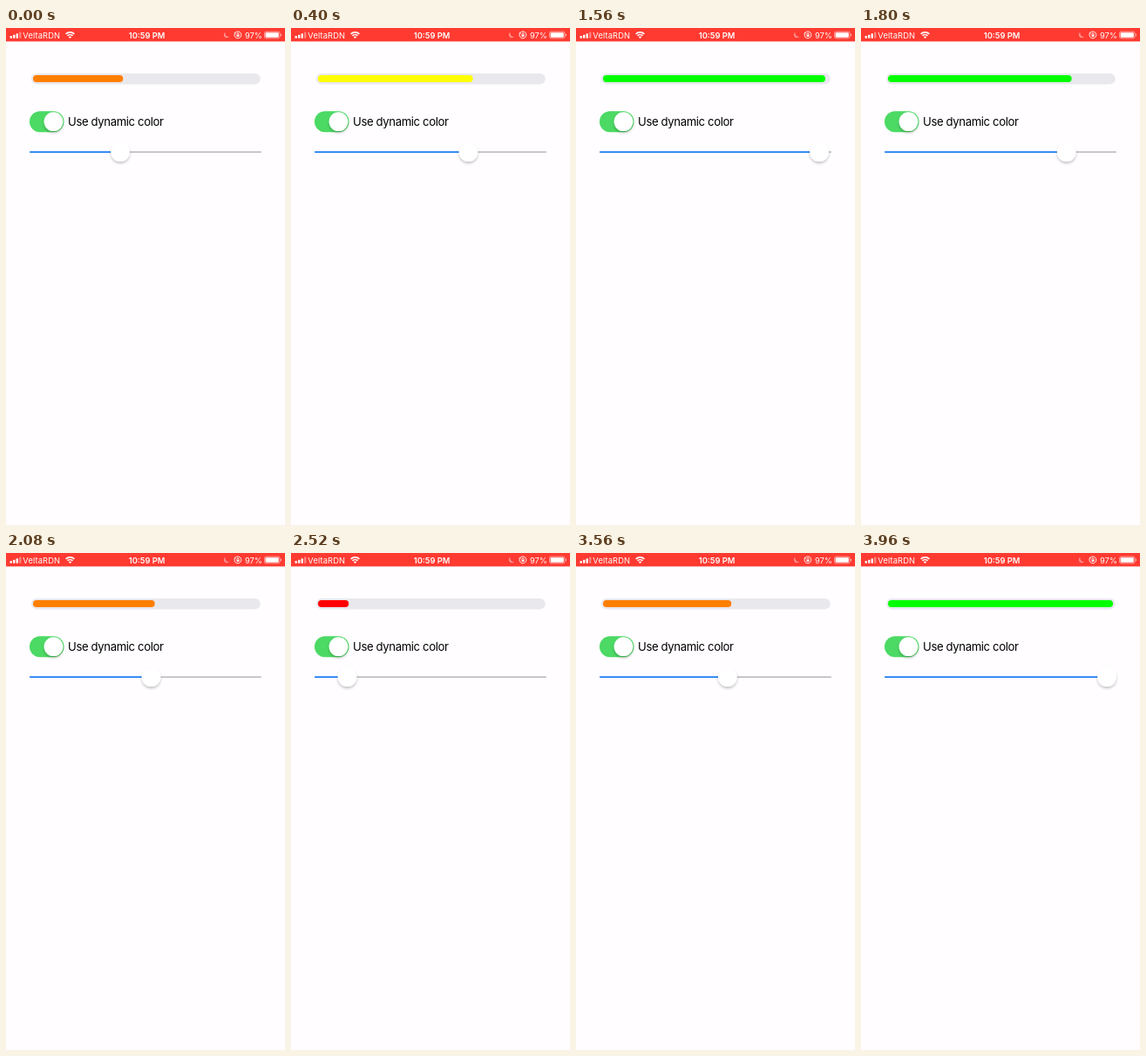
These frames come from a looping animation (320x569 px, 4 s). An HTML page:

```html
<!DOCTYPE html>
<html lang="en">
<head>
<meta charset="utf-8">
<title>Progress slider</title>
<style>
  html, body { margin: 0; width: 100%; height: 100%; overflow: hidden; background: #fffdff; }
  svg { display: block; width: 100vw; height: 100vh; }
  text { font-family: Inter, Roboto, sans-serif; }
  .status text { font-size: 9.3px; fill: #fff; }
  .knob { fill: #fff; }
</style>
</head>
<body>
<svg viewBox="0 0 320 569">
  <defs>
    <filter id="shadow" x="-40%" y="-40%" width="180%" height="190%">
      <feDropShadow dx="0" dy="2" stdDeviation="1.7" flood-color="#000" flood-opacity=".24"/>
    </filter>
  </defs>
  <rect width="320" height="569" fill="#fffdff"/>

  <g class="status">
    <rect width="320" height="15.4" fill="#ff3a31"/>
    <g fill="#fff">
      <rect x="4.6" y="9" width="2.3" height="2.8" rx=".6"/>
      <rect x="8.1" y="7.7" width="2.3" height="4.1" rx=".6"/>
      <rect x="11.6" y="6.2" width="2.3" height="5.6" rx=".6"/>
      <rect x="15.1" y="4.4" width="2.3" height="7.4" rx=".6" opacity=".4"/>
    </g>
    <text x="19.3" y="11.6" letter-spacing=".15">VeltaRDN</text>
    <g fill="none" stroke="#fff" stroke-width="1.6">
      <path d="M68.6 6.9a7 7 0 0 1 9.8 0M70.5 8.9a4.3 4.3 0 0 1 6 0"/>
      <path d="M73.5 12.1l-1.7-1.8a2.5 2.5 0 0 1 3.4 0z" fill="#fff" stroke="none"/>
    </g>
    <text x="161.5" y="11.6" text-anchor="middle" font-weight="600">10:59 PM</text>
    <path d="M251.5 4.8a3.5 3.5 0 1 0 4.7 5a4 4 0 0 1-4.7-5z" fill="#fff" opacity=".45"/>
    <g fill="none" stroke="#fff" stroke-width=".9">
      <path d="M263.2 5.1a3.9 3.9 0 1 1-1 1.6"/>
      <path d="M264.9 7.8v-.8a1.1 1.1 0 0 1 2.2 0v.8"/>
      <rect x="264.5" y="7.8" width="3" height="2.1" fill="#fff" stroke="none"/>
    </g>
    <path d="M261.4 6.7l1.1-2.2 1.4 1.8z" fill="#fff"/>
    <text x="294" y="11.6" text-anchor="end">97%</text>
    <rect x="296.5" y="4.2" width="17.6" height="7.6" rx="2" fill="none" stroke="#fff" stroke-width=".8" opacity=".65"/>
    <rect x="297.6" y="5.3" width="15.2" height="5.4" rx="1" fill="#fff"/>
    <path d="M315 6.5a1.6 1.6 0 0 1 0 3z" fill="#fff" opacity=".65"/>
  </g>

  <rect x="29" y="52" width="262.7" height="12.4" rx="6.2" fill="#e9e8ed"/>
  <rect id="fill" x="31" y="54" height="8" rx="4"/>

  <rect x="27" y="95.2" width="39.5" height="24" rx="12" fill="#4cd964"/>
  <circle class="knob" cx="54.5" cy="107.2" r="10.9" filter="url(#shadow)"/>
  <text x="71" y="112" font-size="13.14" letter-spacing="-.37" fill="#000">Use dynamic color</text>

  <rect x="27" y="141.2" width="266" height="1.6" rx=".8" fill="#b7b6bb"/>
  <rect id="active" x="27" y="141.2" height="1.6" rx=".8" fill="#0a7aff"/>
  <circle id="thumb" class="knob" cy="142" r="10.9" filter="url(#shadow)"/>
</svg>
<script>
  const LOOP = 4000, STEP = 40, MIN = 38, MAX = 282;
  const $ = id => document.getElementById(id);
  const fill = $("fill"), active = $("active"), thumb = $("thumb");

  // time (ms), thumb centre (px), speed (px per ms)
  const drag = [
    [0, 131, .2], [400, 203.5, .16], [960, 267.5, .09], [1200, 282, 0],
    [1520, 282, 0], [1560, 279, -.12], [2080, 166.5, -.25], [2800, 38, 0],
    [3120, 38, 0], [3160, 45.5, .22], [3960, 282.2, .12]
  ];

  function thumbAt(t) {
    const i = drag.findIndex(k => k[0] > t);
    if (i < 0) return MAX;
    const [t0, x0, v0] = drag[i - 1], [t1, x1, v1] = drag[i];
    const d = t1 - t0, u = (t - t0) / d, w = 1 - u;
    const x = w * w * ((1 + 2 * u) * x0 + u * d * v0)
            + u * u * ((1 + 2 * w) * x1 - w * d * v1);
    return Math.min(MAX, Math.max(MIN, x));
  }

  function colorFor(value) {
    if (value < .2) return "#ff0000";
    if (value < .6) return "#ff7f00";
    if (value < .8) return "#ffff00";
    return "#00ff00";
  }

  function draw(t) {
    const x = thumbAt(t), value = (x - MIN) / (MAX - MIN);
    thumb.setAttribute("cx", x);
    active.setAttribute("width", x - 27);
    fill.setAttribute("width", 8 + 250 * value);
    fill.setAttribute("fill", colorFor(value));
  }

  const start = performance.now();
  function tick() {
    const t = (performance.now() - start) % LOOP;
    draw(Math.floor(t / STEP) * STEP);
    requestAnimationFrame(tick);
  }
  draw(0);
  requestAnimationFrame(tick);
</script>
</body>
</html>
```
